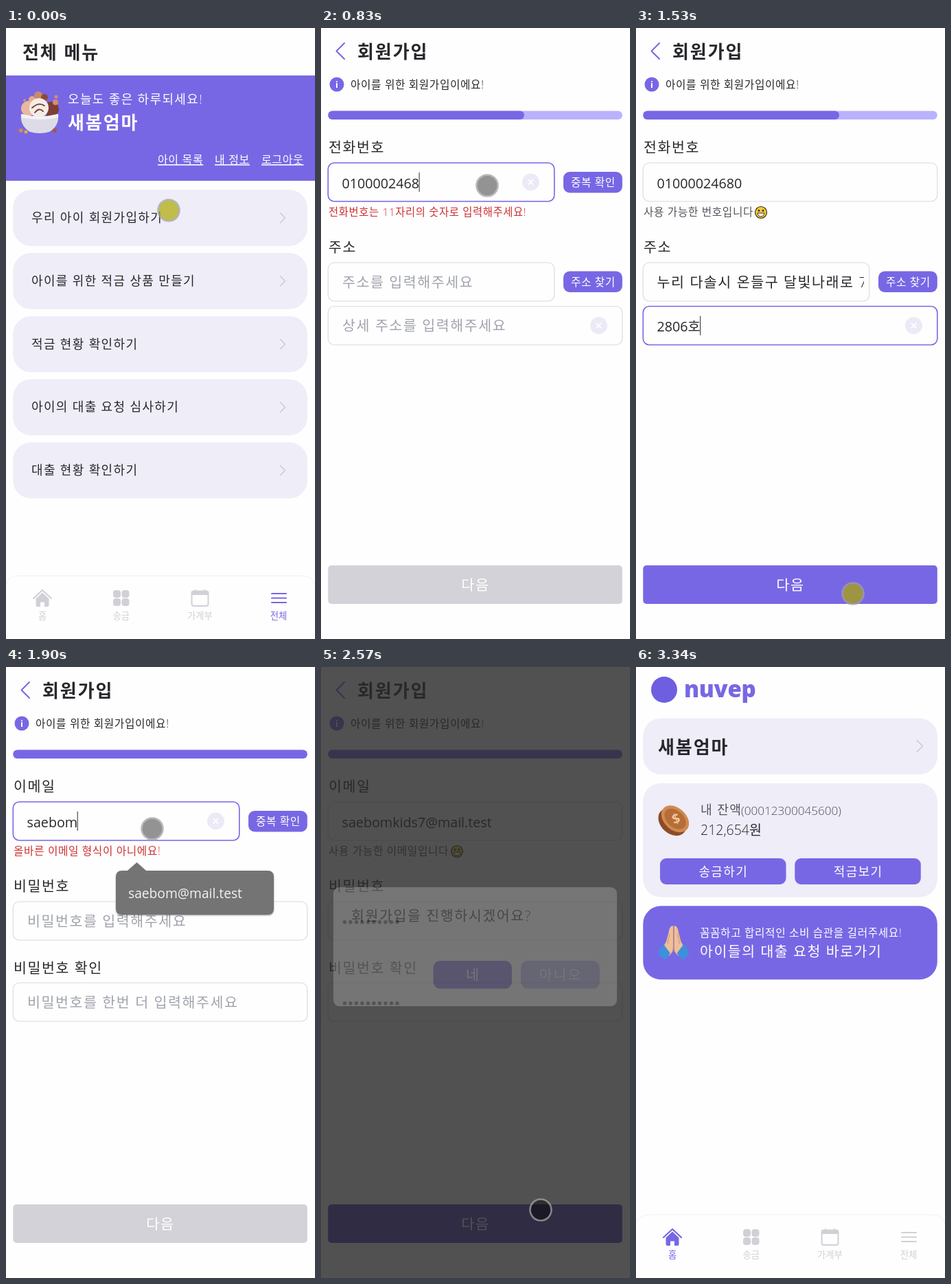
An HTML page for the animation above (3400 ms loop, 450 by 888 pixels).

```html
<!DOCTYPE html>
<html lang="ko">
<head>
<meta charset="utf-8">
<title>회원가입</title>
<style>
  html, body { margin: 0; width: 100%; height: 100%; overflow: hidden; background: #fefefe; }
  svg { display: block; width: 450px; height: 888px; }
  text { font-family: "Open Sans", "Noto Sans CJK KR", "Noto Sans CJK", sans-serif; white-space: pre; }
</style>
</head>
<body>
<svg id="stage" viewBox="0 0 450 888"></svg>
<script>
const LOOP = 3400, STEPS = 49, STEP = LOOP / STEPS;
const PURPLE = '#7867e4', LILAC = '#b9b2fd', CARD = '#eeedf8', INK = '#28272c';
const GRAY = '#d3d2d8', HINT = '#a0a3ad', RED = '#cf2f2f';
const MOTHER = '새봄엄마', PHONE = '01000024680', EMAIL = 'saebomkids7@mail.test';
const stage = document.getElementById('stage');

const clamp = v => Math.max(0, Math.min(1, v));
// Part of a string typed between two steps
const typed = (s, n, from, to) => s.slice(0, Math.round(s.length * clamp((n - from) / (to - from))));

// Text is placed by the vertical centre of its line
function text(x, cy, s, size = 20.6, o = {}) {
  const { fill = INK, weight = 350, anchor = 'start', gap = size < 17 ? .04 : .075, extra = '' } = o;
  return `<text x="${x}" y="${cy + size * .38}" font-size="${size}" fill="${fill}" font-weight="${weight}" text-anchor="${anchor}" letter-spacing="${size * gap}" ${extra}>${s}</text>`;
}
const rect = (x, y, w, h, rx, fill, extra = '') =>
  `<rect x="${x}" y="${y}" width="${w}" height="${h}" rx="${rx}" fill="${fill}" ${extra}/>`;
const circle = (x, y, r, fill, extra = '') => `<circle cx="${x}" cy="${y}" r="${r}" fill="${fill}" ${extra}/>`;
const path = (d, fill, extra = '') => `<path d="${d}" fill="${fill}" ${extra}/>`;
const line = (d, color, width = 2) =>
  path(d, 'none', `stroke="${color}" stroke-width="${width}" stroke-linecap="round" stroke-linejoin="round"`);
const button = (x, y, w, h, label, size, fill = PURPLE, rx = 9, color = '#fff') =>
  rect(x, y, w, h, rx, fill) + text(x + w / 2 + .5, y + h / 2, label, size, { fill: color, anchor: 'middle' });
const chevron = (x, y, r) => line(`M${x} ${y - r}l${r} ${r}l${-r} ${r}`, '#c9c8d0', 1.3);

function bowl() {
  return circle(47, 98, 6, '#c98a66') + circle(56, 101, 5, '#8e4a38') + circle(38, 104, 5, '#e8a98a') +
    circle(33, 117, 11, '#e9b8a0') + circle(66, 118, 11, '#7b3f35') + circle(72, 108, 4, '#d88b72') +
    circle(48, 116, 14, '#f5ece4') + line('M38 116q10 -9 18 -3M42 123q6 -8 12 -2', '#6b3a35', 1.8) +
    path('M22 125q27 7 54 0q2 17 -13 26q-14 4 -28 0q-15 -9 -13 -26z', '#dddce6') +
    path('M22 125q27 7 54 0l-.5 5q-26 6 -53 0z', '#f3f2f7') +
    circle(22, 149, 3, '#c98a66') + circle(29, 151, 2.5, '#e9a84a') + circle(71, 149, 3, '#a4574a') +
    circle(17, 149, 1.5, '#c45f7a') + circle(27, 105, 2, '#cf8d72') + circle(73, 100, 2.5, '#d98a78');
}

function coin() {
  const face = (x, y, rx, ry, fill) => `<ellipse cx="${x}" cy="${y}" rx="${rx}" ry="${ry}" fill="${fill}"/>`;
  return `<g transform="rotate(42 55 223)">${face(55, 226, 23, 17, '#8c4c28')}${face(55, 220, 23, 16, '#d18a4e')}${face(55, 220, 18, 12, '#b56d39')}</g>` +
    text(58, 220, '$', 20, { fill: '#f0c592', weight: 700, anchor: 'middle', gap: 0, extra: 'transform="rotate(-20 58 220)"' });
}

function hands() {
  const half = path('M54 376q-5 0 -6 8l-4 15q-5 7 -3 15l6 6q7 -4 7 -12z', '#efbf98') +
    path('M40 403l10 13l-8 10l-10 -8q2 -10 8 -15z', '#3f8fdd') + line('M49 388l-3 14', '#d89d77', 1.2);
  return `${half}<g transform="matrix(-1 0 0 1 109.5 0)">${half}</g>` + line('M54.8 378v36', '#c98a66', 1);
}

function smiley(x, y) {
  return circle(x, y, 8.5, '#f5c83c', 'stroke="#3a3020" stroke-width="1.2"') +
    circle(x - 3, y - 2.5, 1.4, '#332') + circle(x + 3, y - 2.5, 1.4, '#332') +
    path(`M${x - 5} ${y + 1}h10q-1 5 -5 5t-5 -5z`, '#fff', 'stroke="#332" stroke-width="1"');
}

function navBar(active) {
  const tint = i => i === active ? PURPLE : '#d1d0d6';
  const c = tint(2);
  let out = path('M-1 889V812q3 -16 20 -16H431q17 0 20 16V889z', '#fefefe', 'stroke="#f1f1f3"') +
    line('M40 829L53 817L66 829', tint(0), 2.2) +
    path('M43.5 829.5L53 820.5L62.5 829.5V839q0 2 -2 2H56v-6.500h-6V841H45.500q-2 0 -2 -2z', tint(0)) +
    rect(270.5, 818.5, 24, 21.5, 3, 'none', `stroke="${c}" stroke-width="2"`) + rect(270, 818, 25, 6, 2, c) +
    line('M276 817v2M289 817v2', c) + line('M387 822H408M387 828.5H408M387 835H408', tint(3));
  for (const x of [156, 168.5]) for (const y of [817, 829]) out += rect(x, y, 11, 11, 4, tint(1));
  ['홈', '송금', '가계부', '전체'].forEach((s, i) =>
    out += text(53 + i * 114.7, 854, s, 13.3, { fill: tint(i), anchor: 'middle', gap: 0 }));
  return out;
}

function menuPage() {
  const white = { fill: '#fff' }, link = { fill: '#fff', extra: 'text-decoration="underline"' };
  const items = ['우리 아이 회원가입하기', '아이를 위한 적금 상품 만들기', '적금 현황 확인하기', '아이의 대출 요청 심사하기', '대출 현황 확인하기'];
  return text(24, 35, '전체 메뉴', 26, { weight: 700 }) + rect(0, 69, 450, 153, 0, PURPLE) + bowl() +
    text(90, 103, '오늘도 좋은 하루되세요!', 18, white) + text(90, 137, MOTHER, 26, { fill: '#fff', weight: 700 }) +
    text(221, 191, '아이 목록', 16, link) + text(304, 191, '내 정보', 16, link) + text(372, 191, '로그아웃', 16, link) +
    items.map((s, i) => {
      const y = 235.3 + i * 91.75;
      return rect(10.3, y, 428.5, 81.4, 26, CARD) + text(37, y + 40, s, 18) + chevron(399.5, y + 40.7, 7);
    }).join('') + navBar(3);
}

function homePage() {
  const white = { fill: '#fff' };
  return circle(41, 33, 19, '#6d5fe0') + text(70, 31, 'nuvep', 33, { fill: PURPLE, weight: 800, gap: -.01 }) +
    rect(10.3, 74.5, 428.5, 81.5, 26, CARD) + text(32, 116, MOTHER, 26, { weight: 700 }) + chevron(409, 115, 8.5) +
    rect(10.3, 169, 428.5, 165.5, 26, CARD) + coin() +
    text(94, 207, '내 잔액', 18.2, { fill: '#55545c' }) + text(153, 209, '(00012300045600)', 17.1, { fill: '#55545c', gap: 0 }) +
    text(94, 237, '212,654원', 19.5, { gap: 0 }) +
    button(35, 278, 183.5, 38, '송금하기', 18) + button(231.3, 278, 183.5, 38, '적금보기', 18) +
    rect(10.3, 347.3, 428.5, 107, 26, PURPLE) + hands() +
    text(93, 386, '꼼꼼하고 합리적인 소비 습관을 길러주세요!', 15.7, white) +
    text(93, 413, '아이들의 대출 요청 바로가기', 20.5, white) + navBar(0);
}

function field(y, o) {
  const { w = 428.5, value = '', hint = '', focus, clear, dots = 0, hangul } = o;
  const cy = y + 28;
  let out = rect(10.3, y, w, 56, 9, '#fefefe', `stroke="${focus ? PURPLE : '#dcdbe0'}" stroke-width="${focus ? 1.6 : 1.2}"`);
  if (value) out += text(30.5, cy + (hangul ? 0 : 1.5), value, hangul ? 20.6 : 19.7, { gap: hangul ? .075 : 0, weight: hangul ? 350 : 400, extra: (focus ? 'class="typing" ' : '') + 'clip-path="url(#inner)"' });
  else if (!dots) out += text(31, cy, hint, 20.6, { fill: HINT });
  for (let i = 0; i < dots; i++) out += circle(34.5 + i * 8.5, cy + 1.7, 2.7, INK);
  if (clear) {
    const x = w + 10.3 - 34.3;
    out += circle(x, cy, 12.5, '#ebeaf6') + line(`M${x - 3} ${cy - 3}l6 6m0 -6l-6 6`, '#fff', 2);
  }
  if (focus) out += `<line class="caret" x1="${31 + dots * 8.5}" x2="${31 + dots * 8.5}" y1="${cy - 14}" y2="${cy + 14}" stroke="${INK}"/>`;
  return out;
}

const note = (s, fill = '#55545c', size = 15.7) => text(11, 267, s, size, { fill });
const sideButton = (y, s) => button(353, y, 85.8, 30.5, s, 15.7);

function formFrame(step, ready, pressed) {
  return line('M34 22L22.500 33.500L34 45', PURPLE, 2) + text(53, 34, '회원가입', 26, { weight: 700 }) +
    circle(23, 82, 10.5, PURPLE) + text(23, 82, 'i', 13, { fill: '#fff', weight: 700, anchor: 'middle', gap: 0 }) +
    text(43, 82, '아이를 위한 회원가입이에요!', 15.7) +
    rect(10.3, 120.5, 428.5, 12.5, 6.2, LILAC) + rect(10.3, 120.5, 428.5 * step / 3, 12.5, 6.2, PURPLE) +
    button(10.3, 781, 428.5, 56, '다음', 20.8, pressed ? '#4a38bd' : ready ? PURPLE : GRAY, 5);
}

function nameStep(n) {
  return formFrame(1, n >= 7) + text(11, 173.5, '이름') + text(11, 318.5, '생년월일') +
    field(196, { value: typed('새봄이', n, 2, 4), hangul: true, hint: '이름을 입력해주세요', focus: n > 2 && n < 5, clear: n > 2 && n < 5 }) +
    field(341, { value: typed('20150505', n, 4, 7), hint: '생년월일을 입력해주세요', focus: n >= 5, clear: n >= 5 });
}

function contactStep(n) {
  const phone = typed(PHONE, n, 10, 12.2).slice(0, n < 13 ? 10 : 11), checked = n >= 14;
  const found = n >= 17, detail = typed('2806호', n, 18, 21);
  return formFrame(2, n >= 21) + text(11, 173.5, '전화번호') + text(11, 318.5, '주소') +
    field(196, { w: checked ? 428.5 : 329.5, value: phone, hint: '- 없이 입력해주세요', focus: n > 10 && !checked, clear: !checked }) +
    (checked ? note('사용 가능한 번호입니다') + smiley(182, 268) : sideButton(209, '중복 확인')) +
    (phone && phone.length < 11 ? note('전화번호는 11자리의 숫자로 입력해주세요!', RED, 15.4) : '') +
    field(341, { w: 329.5, value: found ? '누리 다솔시 온들구 달빛나래로 7' : '', hangul: true, hint: '주소를 입력해주세요' }) +
    sideButton(353.5, '주소 찾기') +
    field(404.5, { value: detail, hint: '상세 주소를 입력해주세요', focus: n >= 18, clear: true });
}

function accountStep(n) {
  const mail = n < 27 ? EMAIL.slice(0, Math.max(0, n - 25) * 3) : EMAIL.slice(0, 6 + (n - 27) * 8);
  const checked = n >= 30, dots = from => Math.round(10 * clamp((n - from) / 2));
  let out = formFrame(3, n >= 35, n === 36 || n === 37) +
    text(11, 173.5, '이메일') + text(11, 318.5, '비밀번호') + text(11, 437.5, '비밀번호 확인') +
    field(196, { w: checked ? 428.5 : 329.5, value: mail, hint: '이메일을 입력해주세요', focus: n > 24 && !checked, clear: !checked }) +
    (checked ? note('사용 가능한 이메일입니다') + smiley(198, 268) : sideButton(209, '중복 확인')) +
    (mail && n < 29 ? note('올바른 이메일 형식이 아니에요!', RED) : '') +
    field(341, { dots: dots(30), hint: '비밀번호를 입력해주세요', focus: n === 31 }) +
    field(459, { dots: dots(32), hint: '비밀번호를 한번 더 입력해주세요', focus: n > 31 && n < 35 });
  if (n >= 26 && n <= 28) out += path('M177 296L190.500 284L204 296H381q9 0 9 9V351q0 9 -9 9H169q-9 0 -9 -9V305q0 -9 9 -9z', '#747474', 'style="filter:drop-shadow(0 1px 1px #0006)"') +
    text(178, 329, 'saebom@mail.test', 19.2, { fill: '#f2f2f2', gap: 0, weight: 400 });
  return out;
}

function modal(n) {
  const u = clamp((n * STEP - 2535) / 300), p = 1 - (1 - u) ** 2;
  return rect(0, 0, 450, 888, 0, '#292929', 'opacity=".81"') +
    `<g opacity="${p}" transform="translate(0 ${181 * (1 - p)})">` + rect(18, 176, 413, 173, 9, '#fff') +
    text(44, 217, '회원가입을 진행하시겠어요?') + button(163.5, 283, 114.5, 40.5, '네', 20.8, PURPLE, 10) +
    button(291, 283, 114.8, 40.5, '아니오', 20.8, LILAC, 10) + '</g>';
}

// step, x, y
const TRACK = [[0, 237, 265], [2, 237, 265], [3, 215, 229], [5, 215, 369], [6, 215, 369], [8, 316, 840], [9, 316, 836],
  [11, 242, 229], [12, 242, 229], [13, 400, 224], [14, 400, 224], [15, 410, 369], [17, 410, 369], [18, 250, 432], [20, 250, 432],
  [22, 316, 822], [23, 316, 822], [25, 213, 235], [28, 213, 235], [29, 400, 224], [30, 400, 224], [31, 215, 375],
  [32, 215, 508], [34, 215, 508], [36, 320, 789], [38, 320, 789], [44, 222, 312], [49, 222, 312]];
const CLICKS = [0, 1, 3, 5, 9, 13, 15, 18, 22, 23, 25, 30, 31, 32, 36, 46];

function pointer(n) {
  const i = TRACK.findIndex(k => k[0] > n), [a, ax, ay] = TRACK[i - 1], [b, bx, by] = TRACK[i];
  const p = (n - a) / (b - a), x = ax + (bx - ax) * p, y = ay + (by - ay) * p;
  const click = CLICKS.includes(n);
  if (n >= 39 && !click)
    return path(`M${x} ${y}v16l4 -3.500l2.800 6l2.600 -1.200l-2.700 -5.800h5z`, '#fff', 'stroke="#111" stroke-width="1"');
  return circle(x, y, 14.5, click ? 'rgba(172,168,0,.7)' : 'rgba(0,0,0,.42)') +
    circle(x, y, 15.5, 'none', 'stroke="rgba(165,160,160,.75)" stroke-width="2.6"');
}

function page(n) {
  if (n < 2) return menuPage();
  if (n < 10) return nameStep(n);
  if (n < 24) return contactStep(n);
  if (n < 47) return accountStep(n) + (n >= 37 ? modal(n) : '');
  return homePage();
}

let shown = -1;
function render(ms) {
  const n = Math.min(STEPS - 1, Math.floor(ms / STEP + .15));
  if (n === shown) return;
  shown = n;
  stage.innerHTML = '<clipPath id="inner"><rect x="28" y="150" width="304" height="400"/></clipPath>' +
    rect(0, 0, 450, 888, 0, '#fefefe') + page(n) + (n < 47 ? pointer(n) : '');
  const value = stage.querySelector('.typing'), caret = stage.querySelector('.caret');
  if (value && caret) {
    const x = 30.5 + value.getComputedTextLength();
    caret.setAttribute('x1', x);
    caret.setAttribute('x2', x);
  }
}

const start = performance.now();
function tick() {
  render((performance.now() - start) % LOOP);
  requestAnimationFrame(tick);
}
tick();
</script>
</body>
</html>
```
